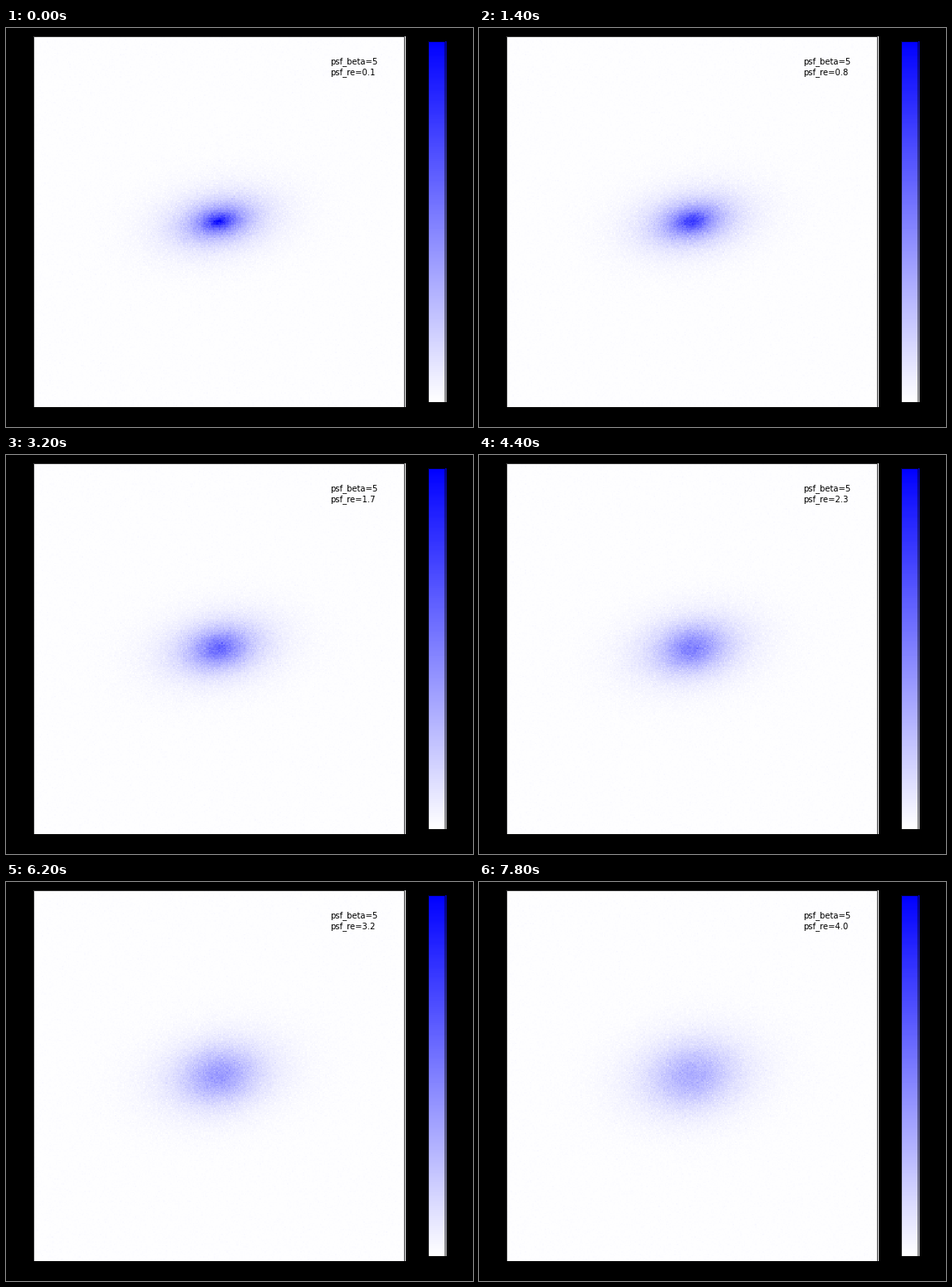
These frames come from a looping animation (562 px wide and 481 px high, 8000 ms). A matplotlib script:

```python
import numpy as np
import matplotlib.pyplot as plt
from matplotlib.animation import FuncAnimation
from matplotlib.colors import LinearSegmentedColormap
from matplotlib.patches import Rectangle

W, H, DPI = 562, 481, 72
FRAMES, INTERVAL = 40, 200
CELLS, SIDE = 301, 447          # image grid and its size on screen
BETA = 5
SCALE = 6.2                     # screen pixels per unit of psf_re

cmap = LinearSegmentedColormap.from_list("blues", ["white", "blue"])
fig = plt.figure(figsize=((W + 1e-4) / DPI, (H + 1e-4) / DPI), dpi=DPI,
                 facecolor="black")


def panel(x, y, w, h, data):
    """Framed image placed by its top-left pixel."""
    ax = fig.add_axes([x / W, 1 - (y + h) / H, w / W, h / H])
    ax.axis("off")
    img = ax.imshow(data, cmap=cmap, vmin=0, vmax=1,
                    interpolation="nearest", aspect="auto")
    frame = Rectangle((x + 0.5, H - y - h - 0.5), w - 1, h, fill=False,
                      ec="black", lw=0.8, snap=False, transform=None)
    ax.add_artist(frame)
    frame.set_clip_on(False)
    return img


def label(x, y, s):
    return fig.text(x / W, 1 - y / H, s, family="DejaVu Sans", size=10,
                    color="black", va="baseline")


# Pixel offsets from the middle of the image, y up
axis = (np.arange(CELLS) - CELLS // 2) * SIDE / CELLS
X, Y = np.meshgrid(axis, -axis)
R2 = X**2 + Y**2


def galaxy(h_major=27, h_minor=14.5, tilt=np.radians(10), cx=-0.7):
    """Inclined exponential disc."""
    dx = X - cx
    u = dx * np.cos(tilt) + Y * np.sin(tilt)
    v = -dx * np.sin(tilt) + Y * np.cos(tilt)
    return 1.03 * np.exp(-np.hypot(u / h_major, v / h_minor))


def moffat(re):
    """Normalised Moffat kernel with half-light radius re."""
    rd = re * SCALE / np.sqrt(0.5 ** (1 / (1 - BETA)) - 1)
    k = (1 + R2 / rd**2) ** -BETA
    return k / k.sum()


disc_ft = np.fft.fft2(galaxy())


def observe(i):
    """Blurred disc with photon and sky noise."""
    rng = np.random.default_rng(100 + i)
    kernel = np.fft.ifftshift(moffat((i + 1) / 10))
    flux = np.fft.ifft2(disc_ft * np.fft.fft2(kernel)).real.clip(0)
    sigma = np.sqrt(flux / 450 + 0.005**2)
    return np.clip(flux + 0.006 + sigma * rng.normal(size=flux.shape), 0.006, 1)


sky = panel(33, 10, SIDE, SIDE, observe(0))
panel(508, 16, 21, 435, np.linspace(1, 0, 256)[:, None])
label(390, 43, f"psf_beta={BETA}")
re_text = label(390, 56, "")


def draw(i):
    sky.set_data(observe(i))
    re_text.set_text(f"psf_re={(i + 1) / 10:.1f}")
    return sky, re_text


anim = FuncAnimation(fig, draw, frames=FRAMES, interval=INTERVAL,
                     repeat=True, repeat_delay=0, blit=False)
plt.show()
```
